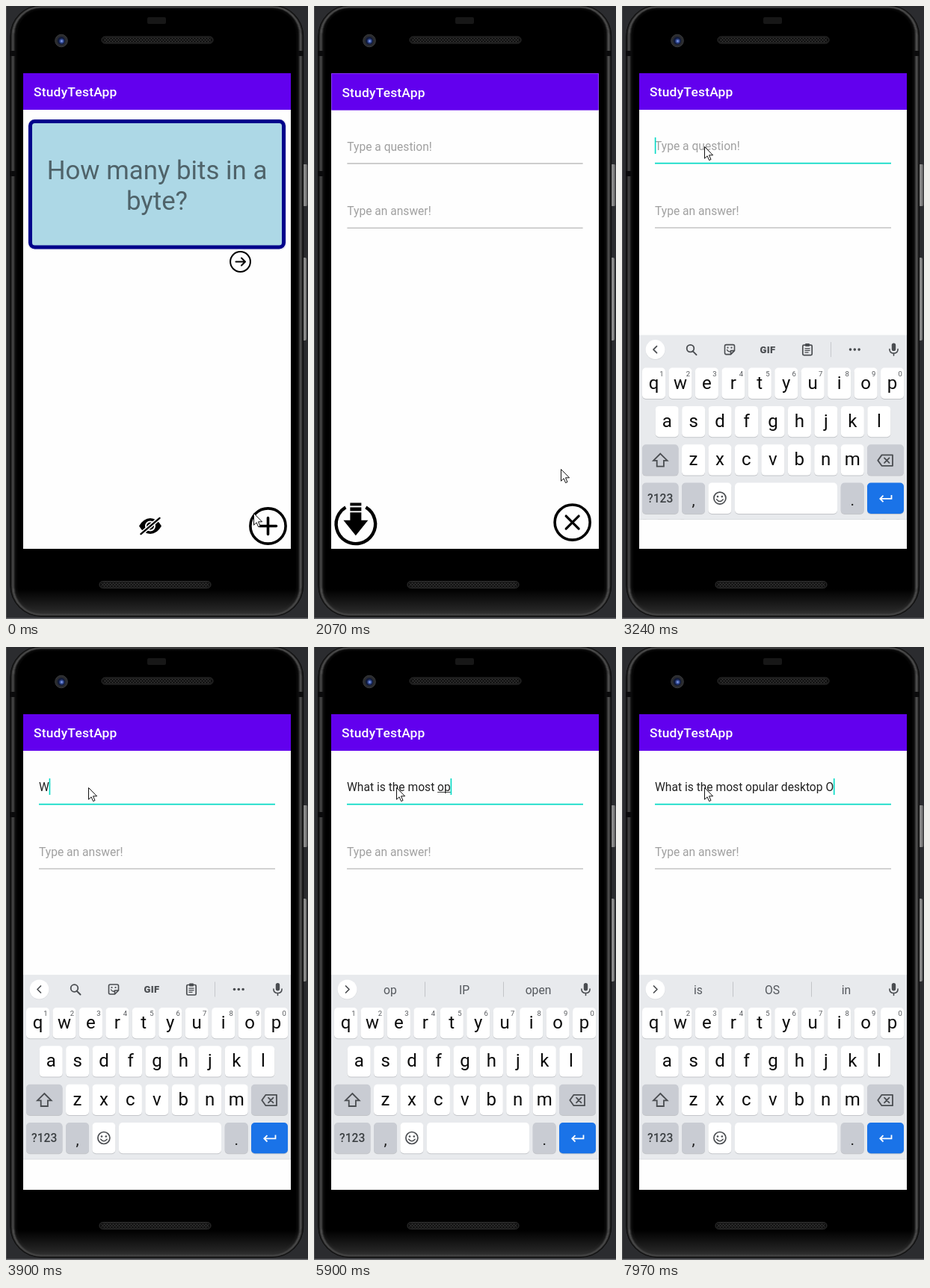
Animation of 404x821 px, one loop 8000 ms. Source, as an HTML page with a canvas:

```html
<!DOCTYPE html>
<html lang="en">
<head>
<meta charset="utf-8">
<title>Study cards</title>
<style>
html, body { margin: 0; width: 100%; height: 100%; overflow: hidden; background: #2b2c2f; }
canvas { display: block; width: 404px; height: 821px; }
</style>
</head>
<body>
<canvas id="stage"></canvas>
<script>
const W = 404, H = 821, LOOP = 8000;
const canvas = document.getElementById('stage');
const g = canvas.getContext('2d');
const dpr = window.devicePixelRatio || 1;
canvas.width = W * dpr;
canvas.height = H * dpr;

const INK = '#000', ICON = '#4a4d51', TEAL = '#03dac5';

// time, x, y: each position holds until the next one
const POINTER = [
  [0, 331, 679], [120, 338, 683], [260, 346, 688], [400, 352, 691], [540, 354, 692],
  [810, 354, 694], [960, 354, 695], [1400, 353, 695], [2060, 330, 620], [2190, 262, 450],
  [2310, 190, 310], [2430, 146, 236], [2550, 128, 210], [2670, 116, 197], [2820, 110, 188]
];

// time, typed text, suggestions that appear one step later
const TYPING = [
  [3780, 'W', 'W|We|What'],
  [3910, 'Wh', 'Wh|What|When'],
  [4040, 'What', 'What|What\'s|Whatever'],
  [4170, 'What ', 'is|are|the'],
  [4300, 'What i', 'i|is|if'],
  [4440, 'What is ', 'the|your|it'],
  [4570, 'What is t', 't|the|this'],
  [4710, 'What is th', 'th|the|this'],
  [4830, 'What is the', 'the|they|there'],
  [4960, 'What is the ', 'best|same|first'],
  [5100, 'What is the m', 'm|most|main'],
  [5240, 'What is the mo', 'mo|most|more'],
  [5380, 'What is the mos', 'mos|most|mostly'],
  [5510, 'What is the most ', 'common|important|popular'],
  [5650, 'What is the most o', 'o|of|on'],
  [5780, 'What is the most op', 'op|IP|open'],
  [5900, 'What is the most op', 'op|IP|open'],
  [6160, 'What is the most opu', 'opu|opus|opulent'],
  [6300, 'What is the most opul', 'opul|opulent|opulence'],
  [6430, 'What is the most opula', 'opula|popular|opulent'],
  [6570, 'What is the most opular', 'opular|popular|ocular'],
  [6700, 'What is the most opular ', 'in|and|song'],
  [6840, 'What is the most opular d', 'd|day|dish'],
  [6980, 'What is the most opular de', 'de|design|dessert'],
  [7120, 'What is the most opular desk', 'desk|desktop|desks'],
  [7260, 'What is the most opular deskt', 'deskt|desktop|desktops'],
  [7400, 'What is the most opular desktop', 'desktop|desktops|Desktop'],
  [7540, 'What is the most opular desktop ', 'is|OS|in'],
  [7830, 'What is the most opular desktop ', 'is|OS|in'],
  [7970, 'What is the most opular desktop O', 'OS|or|of']
];

function indexAt(list, t) {
  let i = -1;
  while (i + 1 < list.length && list[i + 1][0] <= t) i++;
  return i;
}

function rect(x, y, w, h, color) {
  g.fillStyle = color;
  g.fillRect(x, y, w, h);
}

function box(x, y, w, h, r, fill, stroke, lw = 1) {
  g.beginPath();
  g.roundRect(x, y, w, h, r);
  paint(fill, stroke, lw);
}

function paint(fill, stroke, lw) {
  if (fill) { g.fillStyle = fill; g.fill(); }
  if (stroke) { g.strokeStyle = stroke; g.lineWidth = lw; g.stroke(); }
}

function circle(x, y, r, fill, stroke, lw) {
  g.beginPath();
  g.arc(x, y, r, 0, Math.PI * 2);
  paint(fill, stroke, lw);
}

function shape(d, x, y, fill, stroke, lw, cap = 'round') {
  g.save();
  g.translate(x, y);
  g.lineCap = cap;
  g.lineJoin = cap === 'round' ? 'round' : 'miter';
  const p = new Path2D(d);
  if (fill) { g.fillStyle = fill; g.fill(p); }
  if (stroke) { g.strokeStyle = stroke; g.lineWidth = lw; g.stroke(p); }
  g.restore();
}

function font(size, weight = 400) {
  g.font = `${weight} ${size}px Roboto, Arial, sans-serif`;
}

function text(s, x, y, size, color, align = 'left', weight = 400, spacing = 0) {
  font(size, weight);
  g.letterSpacing = spacing + 'px';
  g.textAlign = align;
  g.fillStyle = color;
  g.fillText(s, x, y);
  g.letterSpacing = '0px';
}

function gradient(x0, y0, x1, y1, colors) {
  const fill = g.createLinearGradient(x0, y0, x1, y1);
  colors.forEach((c, i) => fill.addColorStop(i / (colors.length - 1), c));
  return fill;
}

function speaker(x, y) {
  box(x, y, 149, 9, 4.5, '#0d0d0d', '#333', 1);
  g.save();
  g.beginPath();
  g.roundRect(x + 2, y + 1, 145, 7, 3.5);
  g.clip();
  g.beginPath();
  for (let i = -8; i < 150; i += 4) {
    g.moveTo(x + i, y); g.lineTo(x + i + 9, y + 9);
    g.moveTo(x + i + 9, y); g.lineTo(x + i, y + 9);
  }
  paint(null, '#404040', 0.8);
  g.restore();
}

function phone() {
  rect(0, 0, W, H, '#2b2c2f');
  rect(0, 0, 1, H, '#4b4c4e');
  rect(0, 819.5, W, 1.5, '#6a6b6e');

  const metal = gradient(396, 0, 404, 0, ['#2a2a2b', '#9a9a9a', '#7c7c7c', '#3c3c3d']);
  box(396, 212, 7.5, 56, 2, metal);
  box(396, 337, 6, 111, 2, metal);

  // bevelled rim, brightest a few pixels in from the edge
  box(5.5, -1, 392.5, 818.5, 42, '#050505');
  for (let k = 0; k < 10; k++) {
    const v = Math.round(6 + 74 * Math.exp(-(((k - 3.5) / 2.3) ** 2)));
    box(6 + k, -0.5 + k * 0.6, 391.5 - 2 * k, 817.5 - k * 1.2, 41 - k, null, `rgb(${v},${v},${v})`, 1.3);
  }
  const glass = gradient(0, 6, 0, 810, ['#000', '#000']);
  glass.addColorStop(0.95, '#000');
  box(15.5, 5.5, 372.5, 805, 32, glass);
  g.save();
  g.beginPath();
  g.roundRect(8, 2, 387.5, 814, 39);
  g.clip();
  rect(8, 781, 388, 36, gradient(0, 781, 0, 817, ['rgba(64,64,64,0)', 'rgba(64,64,64,.75)']));
  g.restore();

  for (const y of [60, 221]) rect(5, y, 8, 7, '#0b0b0c');
  rect(391, 60, 7, 7, '#0b0b0c');
  box(189, 15, 25, 9, 2, '#171717');
  speaker(128, 41);
  speaker(125, 770.5);
  circle(74, 46.5, 8.3, '#2a2b2e', '#3a3b3e', 1);
  circle(74, 46.5, 5.2, '#101a3a');
  const lens = g.createRadialGradient(74.5, 47, 0, 74.5, 47, 4);
  lens.addColorStop(0, '#a8bcf4');
  lens.addColorStop(0.4, '#4460b8');
  lens.addColorStop(1, '#101a3a');
  circle(74.5, 47, 4, lens);
}

function page() {
  rect(23, 90, 358, 637, '#fefefe');
  rect(23, 90, 358, 49, '#6200ee');
  text('StudyTestApp', 37, 121, 17.4, '#fff', 'left', 500, 0.22);
}

function cardPage() {
  page();
  box(29.5, 151.5, 345.5, 175, 8, '#e4e4f0');
  box(32.5, 154.5, 339, 168.5, 6, '#add8e6', '#00008b', 5);
  text('How many bits in a', 202, 232, 34.84, 'rgba(0,0,0,.54)', 'center');
  text('byte?', 202, 273, 34.84, 'rgba(0,0,0,.54)', 'center');

  circle(313.5, 342.5, 13.4, null, INK, 2);
  shape('M-6 0H6.3M1.5 -5L6.5 0L1.5 5', 313.5, 342.5, null, INK, 2);

  shape('M-15 0Q-9 -10.5 0 -10.5Q9 -10.5 15 0Q9 10.5 0 10.5Q-9 10.5 -15 0Z', 193, 696.5, INK);
  circle(193, 696.5, 6, null, '#fefefe', 2);
  shape('M-14 12L14 -12', 193, 696.5, null, '#fefefe', 5.4, 'butt');
  shape('M-12.5 10.7L12.5 -10.7', 193, 696.5, null, INK, 2.4);

  circle(350.5, 696.5, 23.6, null, INK, 3.6);
  shape('M-11 0H11M0 -11V11', 350.5, 696.5, null, INK, 3.6);
}

function formPage(t) {
  page();
  const focus = t >= 2940;
  const i = indexAt(TYPING, t);
  const typed = i < 0 ? '' : TYPING[i][1];
  if (typed) text(typed, 44, 193, 15.62, 'rgba(0,0,0,.87)');
  else text('Type a question!', 44, 193, 15.62, '#a0a0a0');
  text('Type an answer!', 44, 280, 15.62, '#a0a0a0');
  if (focus) rect(44, 209.8, 316, 1.7, TEAL);
  else rect(44, 210, 316, 1, '#9c9c9c');
  rect(44, 296.5, 316, 1, '#a8a8a8');

  font(15.62);
  const width = s => g.measureText(s).width;
  if (i > 0) {
    const before = TYPING[i - 1][1];
    const start = before.lastIndexOf(' ') + 1;
    if (start < before.length && !typed.endsWith(' ')) {
      const x = width(before.slice(0, start));
      rect(44 + x, 194, width(before) - x, 1, '#444');
    }
  }
  if (focus && (t < 3480 || typed)) rect(43.8 + width(typed), 176, 1.6, 22, TEAL);

  g.beginPath();
  g.arc(55.5, 694.5, 26.3, -1.03, Math.PI + 1.03);
  paint(null, INK, 4.4);
  rect(48, 666, 15, 4, INK);
  rect(48, 672, 15, 5, INK);
  shape('M-7.5 -15.5H7.5V-5H16.5L0 15.5L-16.5 -5H-7.5Z', 55.5, 694.5, INK);

  circle(346, 692.2, 23.6, null, INK, 3.6);
  shape('M-8.5 -8.5L8.5 8.5M8.5 -8.5L-8.5 8.5', 346, 692.2, null, INK, 3.2);
}

function key(x, y, w, fill = '#fff') {
  box(x, y + 1, w, 41.3, 5, '#c3c5c9');
  box(x, y, w, 41.3, 5, fill);
}

function letterRow(letters, x, y, digits) {
  [...letters].forEach((c, i) => {
    const kx = x + i * 35.45;
    key(kx, y, 31);
    text(c, kx + 15.5, y + 28, 24, '#0c0c0c', 'center');
    if (digits) text((i + 1) % 10, kx + 26, y + 11, 9.5, '#55585c', 'center');
  });
}

function tools() {
  circle(91.5, 457, 4.8, null, ICON, 1.8);
  shape('M3 3L8 8', 91.5, 457.5, null, ICON, 2);

  shape('M-4.5 -6.5H4.5Q6.5 -6.5 6.5 -4.5V1.5L1.5 6.5H-4.5Q-6.5 6.5 -6.5 4.5V-4.5Q-6.5 -6.5 -4.5 -6.5ZM6.5 1.5H1.5V6.5', 144, 458.5, null, ICON, 1.6);
  shape('M-3.4 0.5Q-1.5 3.5 1 2.5', 144, 458.5, null, ICON, 1.4);
  circle(141.5, 456, 1.1, ICON);
  circle(146.5, 456, 1.1, ICON);

  text('GIF', 195, 463, 13, ICON, 'center', 900, 0.4);

  box(241.8, 452.5, 12.4, 13.5, 1.5, null, ICON, 1.7);
  box(245, 450.5, 6, 4, 1, ICON);
  for (let k = 0; k < 3; k++) rect(244.5, 456.5 + k * 2.6, k < 2 ? 7 : 5, 1.3, ICON);

  rect(279, 448.5, 1, 20, '#c6c8cc');
  for (const x of [305.5, 311.3, 317.1]) circle(x, 458.5, 1.8, ICON);
}

function suggestions(list) {
  list.split('|').forEach((s, i) => text(s, 102 + i * 99, 465, 15.7, '#55595e', 'center'));
  rect(148, 448.5, 1, 20, '#c2c4c8');
  rect(253, 448.5, 1, 20, '#c2c4c8');
}

function keyboard(t, dy) {
  g.save();
  g.translate(0, dy);
  rect(23, 439, 358, 247, '#e8eaed');
  rect(23, 686, 358, 60, '#fefefe');
  rect(23, 685.5, 358, 1, '#dcdee1');

  const i = indexAt(TYPING, t);
  circle(44.5, 459, 13.2, '#d6d8dc');
  circle(44.5, 458.5, 13, '#fff');
  shape(i > 0 ? 'M-2 -4.5L2.5 0L-2 4.5' : 'M2 -4.5L-2.5 0L2 4.5', 44.5, 458.5, null, ICON, 1.7);
  if (i > 0) suggestions(TYPING[i - 1][2]);
  else tools();

  box(360.8, 450, 5.4, 10.5, 2.7, ICON);
  shape('M-5.6 -0.5Q-5.6 5 0 5Q5.6 5 5.6 -0.5M0 5V8', 363.5, 458.5, null, ICON, 1.6);

  letterRow('qwertyuiop', 27, 483, true);
  letterRow('asdfghjkl', 44.7, 534.3);
  letterRow('zxcvbnm', 80, 585.7);

  const grey = '#c9ccd3';
  key(27, 585.7, 48.5, grey);
  shape('M0 -9L9.3 0.3H4.6V8H-4.6V0.3H-9.3Z', 51.3, 607, null, ICON, 1.8, 'butt');
  key(328, 585.7, 49, grey);
  shape('M-5 -7.2H9.5V7.2H-5L-10.2 0Z', 352.5, 607, null, ICON, 1.8);
  shape('M-1.5 -3.3L5 3.3M5 -3.3L-1.5 3.3', 352.5, 607, null, ICON, 1.8);

  key(27, 637, 48.5, grey);
  text('?123', 51.2, 663, 15.6, '#3c4043', 'center', 500);
  key(80, 637, 31, grey);
  text(',', 95.5, 667, 21, '#1c1c1c', 'center');
  key(115.4, 637, 31);
  circle(130.9, 657.5, 8, null, ICON, 1.7);
  circle(128, 655.5, 1.3, ICON);
  circle(133.8, 655.5, 1.3, ICON);
  shape('M-4.2 1.8Q0 6.8 4.2 1.8', 130.9, 657.5, null, ICON, 1.5);
  key(151, 637, 137);
  key(292.7, 637, 31, grey);
  text('.', 308.2, 667, 21, '#1c1c1c', 'center');
  key(328, 637, 49, '#1a73e8');
  shape('M8 -4V0.8H-7M-3 -3.4L-7.2 0.8L-3 5', 352.5, 657.5, null, '#fff', 1.8, 'butt');
  g.restore();
}

function pointer(t) {
  const [, x, y] = POINTER[indexAt(POINTER, t)];
  shape('M.5 .5V16.2L4.1 12.8L6.6 18.6L9 17.5L6.5 11.8H11.6Z', x, y, '#fff', '#111', 1, 'butt');
}

function screen(t) {
  g.save();
  g.beginPath();
  g.rect(23, 90, 358, 637);
  g.clip();
  const step = Math.floor((t - 1800) / 127) + 1;
  const p = Math.max(0, Math.min(1, step / 4));
  if (p < 1) cardPage();
  if (p > 0) {
    const s = 1 - 0.15 * (1 - p) ** 3;
    g.save();
    g.globalAlpha = Math.min(1, p * 2);
    g.translate(202, 408.5);
    g.scale(s, s);
    g.translate(-202, -408.5);
    formPage(t);
    g.restore();
  }
  if (t >= 3080) keyboard(t, t < 3240 ? 75 : t < 3360 ? 1.6 : 0);
  g.restore();
}

function draw(now) {
  const t = now % LOOP;
  g.setTransform(dpr, 0, 0, dpr, 0, 0);
  phone();
  screen(t);
  pointer(t);
}

let begin;
function tick(now) {
  if (begin === undefined) begin = now;
  draw(now - begin);
  requestAnimationFrame(tick);
}
draw(0);
requestAnimationFrame(tick);
</script>
</body>
</html>
```
